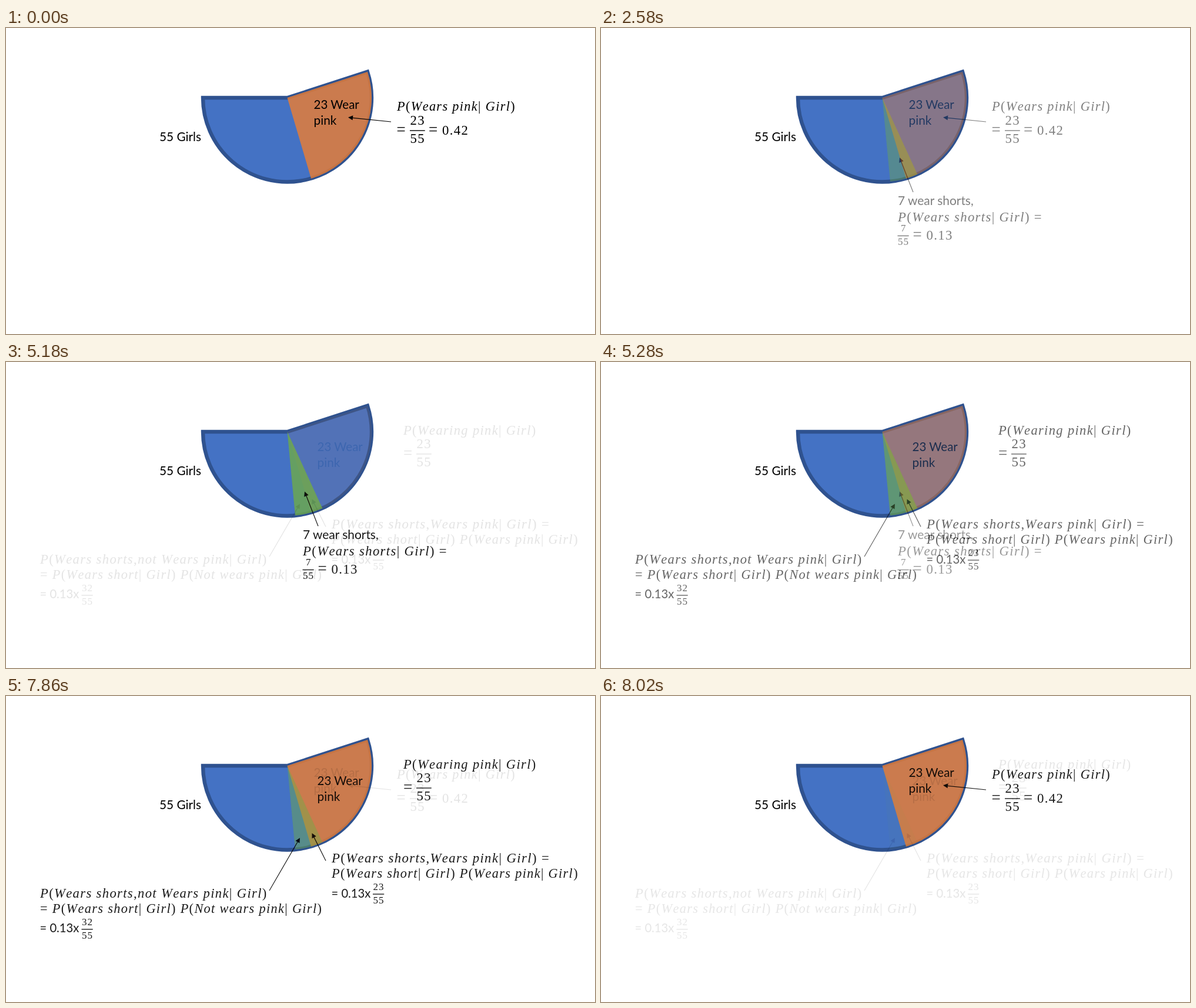
An HTML page for the animation above (8040 ms loop, 1002x522 px).

```html
<!DOCTYPE html>
<html lang="en">
<head>
<meta charset="utf-8">
<title>Conditional probability pie</title>
<style>
  html, body { margin: 0; width: 100%; height: 100%; overflow: hidden; background: #fff; }
  svg { position: absolute; left: 0; top: 0; width: 1002px; height: 522px; background: #fff; }
  .label { font-family: Lato, Carlito, sans-serif; }
  .math { font-family: "Liberation Serif", serif; letter-spacing: .06em; font-kerning: none; white-space: pre; }
  .math tspan { font-style: italic; }
</style>
</head>
<body>
<script>
const CX = 478.5, CY = 119, RADIUS = 143.5;
const HOLD = 2500, STEP = 20, STEPS = 9;
const SCENE_TIME = HOLD + STEP * STEPS;

// Angles in degrees, clockwise from the positive x axis.
function sector(from, to, attributes) {
  const point = deg => {
    const a = deg * Math.PI / 180;
    return `${CX + RADIUS * Math.cos(a)} ${CY + RADIUS * Math.sin(a)}`;
  };
  const large = to - from > 180 ? 1 : 0;
  return `<path d="M${CX} ${CY}L${point(from)}A${RADIUS} ${RADIUS} 0 ${large} 1 ${point(to)}Z" ${attributes}/>`;
}

const label = (x, y, text, size = 20.5) =>
  `<text class="label" x="${x}" y="${y}" font-size="${size}">${text}</text>`;

// Letters are italic; digits and signs stay upright.
const math = (x, y, text, size = 22.4) =>
  `<text class="math" x="${x}" y="${y}" font-size="${size}">${text.replace(/[a-z]+/gi, '<tspan>$&</tspan>')}</text>`;

const equals = (x, y) => math(x, y, '=', 27);

function fraction(x, y, top, bottom, size = 22.8) {
  const width = size * 1.13, indent = top.length < 2 ? size * .29 : 0;
  return math(x + indent, y - size * .44, top, size)
    + math(x, y + size * .92, bottom, size)
    + `<path d="M${x - .5} ${y}h${width}" stroke="#000" stroke-width="1.4"/>`;
}

function arrow(x1, y1, x2, y2) {
  const angle = Math.atan2(y2 - y1, x2 - x1) * 180 / Math.PI;
  const length = Math.hypot(x2 - x1, y2 - y1);
  return `<g transform="translate(${x2} ${y2}) rotate(${angle})">
    <path d="M${-length} 0H-6" stroke="#000" stroke-width="1.2"/><path d="M0 0L-8 -4V4Z"/></g>`;
}

const girls = sector(-18, 180, 'fill="#4472c4" stroke="#2f528f" stroke-width="6.4"')
  + label(261, 193, '55 Girls', 20.8);
const pink = sector(-18, 73.6, 'fill="#ed7d31" opacity=".8"');
const shorts = opacity => sector(65.4, 84.6, `fill="#70ad47" opacity="${opacity}"`);
const pinkLabel = (x, y) => label(x, y, '23 Wear') + label(x, y + 27, 'pink', 20.8);

const scenes = [
  girls + pink + pinkLabel(523.5, 138)
    + arrow(655, 160, 582, 152.5)
    + math(665, 141, 'P(Wears pink| Girl)', 22.3)
    + equals(664.5, 182) + fraction(687.5, 175, '23', '55')
    + equals(719, 182) + math(742, 182, '0.42', 22.8),

  girls + shorts(.8)
    + arrow(531, 280, 508, 221)
    + label(505, 302, '7 wear shorts,', 20.9)
    + math(505, 330, 'P(Wears shorts| Girl) =', 22.7)
    + fraction(505, 354.5, '7', '55', 17)
    + equals(530.5, 361) + math(553.5, 361, '0.13', 22.8),

  girls + pink + shorts(.5) + pinkLabel(529.5, 152)
    + arrow(448, 332, 500, 242) + arrow(544, 281, 520.5, 234)
    + math(676, 124, 'P(Wearing pink| Girl)', 22.5)
    + equals(676, 164) + fraction(698.5, 157, '23', '55')
    + math(554, 284, 'P(Wears shorts,Wears pink| Girl) =', 22.8)
    + math(554, 310, 'P(Wears short| Girl) P(Wears pink| Girl)', 22.3)
    + label(553.5, 343.5, '= 0.13x', 20.2) + fraction(624.5, 338, '23', '55', 17)
    + math(58, 344, 'P(Wears shorts,not Wears pink| Girl)', 22.6)
    + math(58, 370, '= P(Wears short| Girl) P(Not wears pink| Girl)', 22.3)
    + label(57.5, 403, '= 0.13x', 20.2) + fraction(129, 398, '32', '55', 17)
];

document.body.innerHTML = scenes.map(s => `<svg viewBox="0 0 1002 522">${s}</svg>`).join('');
const layers = [...document.querySelectorAll('svg')];

function render() {
  const time = performance.now() % (SCENE_TIME * scenes.length);
  const current = Math.floor(time / SCENE_TIME);
  const next = (current + 1) % scenes.length;
  const fading = time % SCENE_TIME - HOLD;
  const blend = fading < 0 ? 0 : (Math.floor(fading / STEP) + 1) / (STEPS + 1);
  layers.forEach((layer, i) => {
    layer.style.opacity = i === current ? 1 : i === next ? blend : 0;
    layer.style.zIndex = i === next ? 1 : 0;
  });
  requestAnimationFrame(render);
}
render();
</script>
</body>
</html>
```
